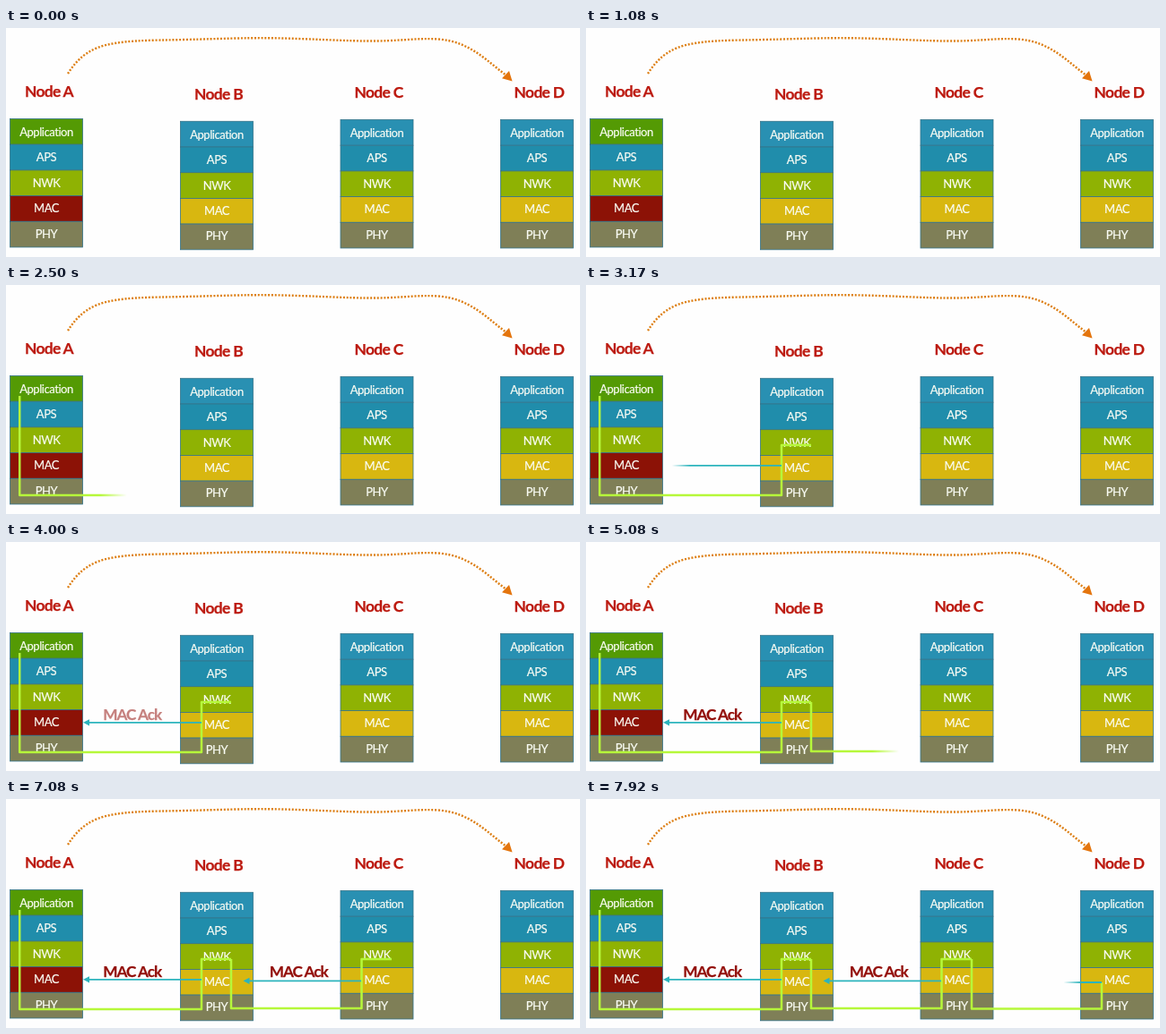
Recreate the animation shown at these times as an HTML page. Size 640 by 256 pixels, loop 8 s.

```html
<!DOCTYPE html>
<html lang="en">
<head>
<meta charset="utf-8">
<title>Mesh hop acknowledgements</title>
<style>
html, body { margin: 0; width: 100%; height: 100%; overflow: hidden; background: #fefefe; }
svg { display: block; width: 100vw; height: 100vh; }
text { font-family: Carlito, Lato, sans-serif; text-anchor: middle; }
.node { font-size: 17.4px; font-weight: 700; letter-spacing: -0.65px; fill: #bc1a10; stroke: #bc1a10; stroke-width: 0.25px; }
.layer { font-size: 13px; letter-spacing: -0.45px; fill: #fafcf4; stroke: #fafcf4; stroke-width: 0.2px; }
.ack { font-size: 17.2px; font-weight: 700; letter-spacing: -1px; fill: #930f0a; stroke: #930f0a; stroke-width: 0.25px; }
</style>
</head>
<body>
<svg id="stage" viewBox="0 0 640 256"></svg>
<script>
const LOOP = 8000, FPS = 12, WIPE = 500, FADE = 500;
const stage = document.getElementById('stage');

function add(tag, attrs, parent = stage, label) {
  const el = document.createElementNS('http://www.w3.org/2000/svg', tag);
  for (const key in attrs) el.setAttribute(key, attrs[key]);
  if (label) el.textContent = label;
  return parent.appendChild(el);
}

const clamp = v => Math.min(1, Math.max(0, v));
const LAYERS = ['Application', 'APS', 'NWK', 'MAC', 'PHY'];
const COLORS = ['#2990b2', '#208dab', '#8fb203', '#d8b710', '#7f7f57'];
const SENDER = ['#549a04', '#208dab', '#8fb203', '#8c1206', '#7f7f57'];

function drawNode(name, x, y, titleX, titleY, colors) {
  add('text', { x: titleX, y: titleY, class: 'node' }, stage, name);
  const h = 28.7, w = 81;
  LAYERS.forEach((label, i) => {
    const top = y + i * h;
    add('rect', { x, y: top, width: w, height: h, fill: colors[i], stroke: '#34748a', 'stroke-width': 0.8 });
    add('text', { x: x + w / 2, y: top + h / 2 + 5.2 - i * 0.3, class: 'layer' }, stage, label);
  });
}

// Horizontal soft-edged reveal, painted through a gradient
function makeWipe(id, color, from, to, start, soft) {
  const grad = add('linearGradient', { id, gradientUnits: 'userSpaceOnUse', y1: 0, y2: 0 });
  add('stop', { offset: 0, 'stop-color': color }, grad);
  add('stop', { offset: 1, 'stop-color': color, 'stop-opacity': 0 }, grad);
  const dir = Math.sign(to - from), a = from - 5 * dir, b = to + 5 * dir;
  return t => {
    const tip = a + (b - a + soft * dir) * clamp((t - start) / WIPE);
    grad.setAttribute('x1', tip - soft * dir);
    grad.setAttribute('x2', tip);
  };
}

const updates = [];

function addRoute(id, d, from, to, start) {
  updates.push(makeWipe(id, '#b6f83a', from, to, start, 30));
  add('path', { d, fill: 'none', stroke: `url(#${id})`, 'stroke-width': 2.5, 'stroke-linejoin': 'round' });
}

function addArrow(id, from, to, y, start) {
  updates.push(makeWipe(id, '#2cb4bd', from, to, start, 20));
  const paint = `url(#${id})`;
  add('path', { d: `M${from} ${y}H${to + 5}`, stroke: paint, 'stroke-width': 1.8 });
  add('path', { d: `M${to} ${y}l7-3.6v7.2z`, fill: paint });
}

function addAck(x, y, start) {
  const el = add('text', { x, y, class: 'ack' }, stage, 'MAC Ack');
  updates.push(t => el.setAttribute('opacity', clamp((t - start) / FADE)));
}

drawNode('Node A', 4.5, 101.5, 48, 77, SENDER);
drawNode('Node B', 194.5, 104.3, 237, 79.5, COLORS);
drawNode('Node C', 373, 102.5, 415.5, 78, COLORS);
drawNode('Node D', 551.5, 102.5, 594.5, 78, COLORS);

add('path', {
  d: 'M69 51C76 40 85 29 102 22C126 13 160 14 200 13C240 12 265 11 290 11.2C335 11.5 380 15 414 14.5C445 14 460 11 482 12.5C518 15 537 38 558 53',
  fill: 'none', stroke: '#dd7f14', 'stroke-width': 2.4, 'stroke-dasharray': '2 1.8'
});
add('path', { d: 'M564.5 59.5L553 56.3L561 48z', fill: '#e4750e' });

addRoute('route1', 'M15.2 124V235H218V179H251', 15, 251, 2274);
addRoute('route2', 'M251 179V234H396.5V179H430', 251, 430, 4848);
addRoute('route3', 'M430 179V234.5H575V205', 430, 575, 7270);
addArrow('arrow1', 218, 86, 201.8, 2774);
addArrow('arrow2', 396, 264.5, 203.3, 5348);
addArrow('arrow3', 575, 443, 205, 7770);
addAck(140.7, 198.7, 3740);
addAck(326.2, 198.7, 6250);

function render(ms) {
  const t = Math.floor((ms % LOOP + 4) * FPS / 1000) * 1000 / FPS;
  updates.forEach(update => update(t));
}

const begin = performance.now();
function tick() {
  render(performance.now() - begin);
  requestAnimationFrame(tick);
}
tick();
</script>
</body>
</html>
```
